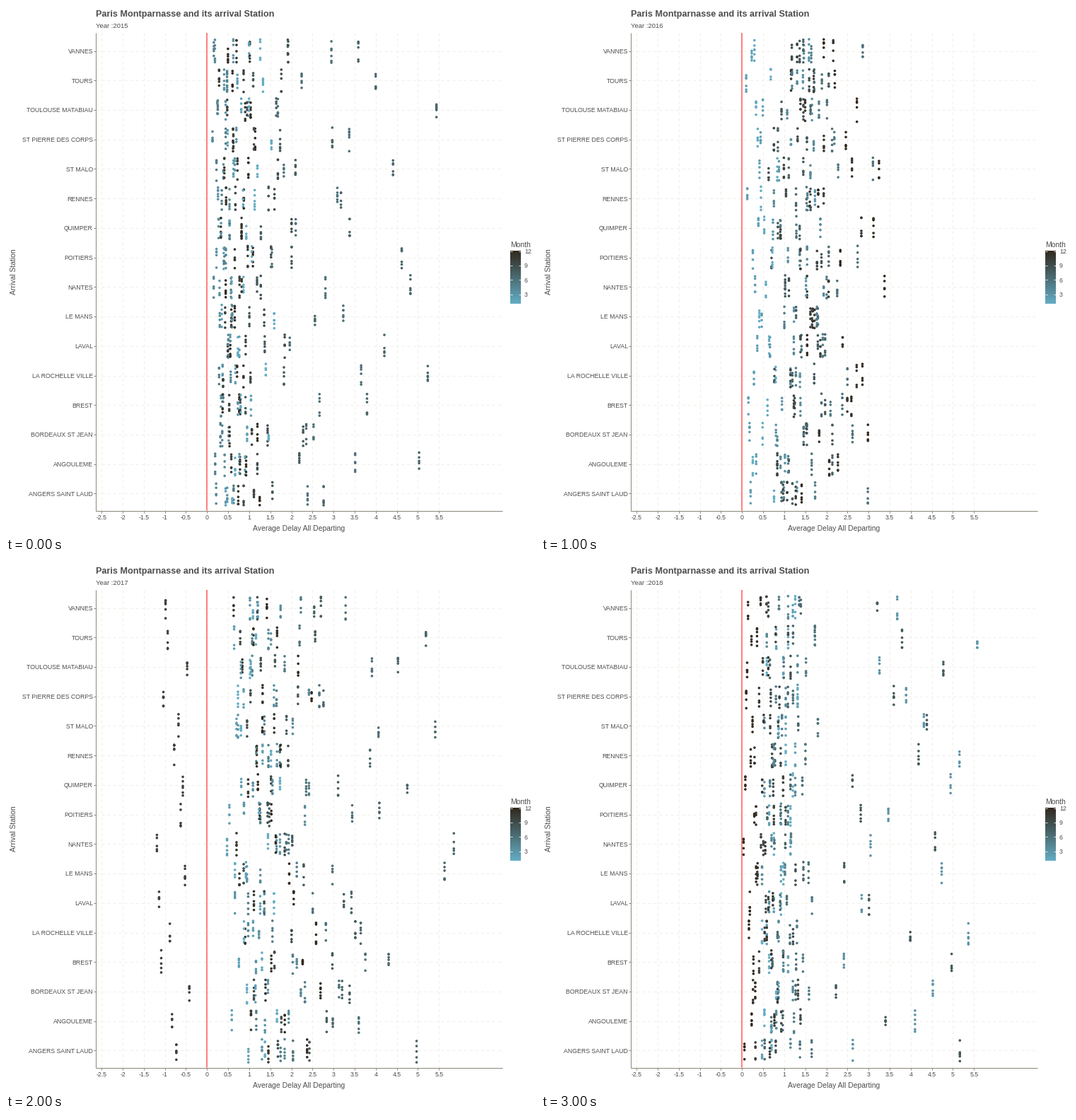
A matplotlib script for the animation above (4000 ms loop, 748 px wide and 748 px high).

```python
import numpy as np
import matplotlib.pyplot as plt
from matplotlib.animation import FuncAnimation
from matplotlib.colors import LinearSegmentedColormap

SIZE, DPI = 748, 100
ZERO, UNIT = 284, 59.64            # x of zero and width of one minute
LEFT, RIGHT, TOP, BOTTOM = 127.5, 702, 38, 713.5
FIRST_ROW, ROW_STEP, JITTER = 63, 41.73, 16.7
GREY, AXIS, GRID = "#4d4d4d", "#8b8878", "#f0eee7"

STATIONS = ["VANNES", "TOURS", "TOULOUSE MATABIAU", "ST PIERRE DES CORPS",
            "ST MALO", "RENNES", "QUIMPER", "POITIERS", "NANTES", "LE MANS",
            "LAVAL", "LA ROCHELLE VILLE", "BREST", "BORDEAUX ST JEAN",
            "ANGOULEME", "ANGERS SAINT LAUD"]
MONTHS = LinearSegmentedColormap.from_list("months", ["#64acc4", "#32291f"])

# Typical delay in minutes, January to December
TYPICAL = {
    2015: [1.1, 0.7, 0.5, 0.35, 0.4, 2.6, 3.9, 1.6, 1.4, 0.75, 0.6, 0.85],
    2016: [0.55, 0.3, 1.2, 1.35, 1.6, 2.2, 1.5, 1.5, 1.15, 1.35, 2.0, 2.4],
    2017: [1.2, 0.9, 1.2, 1.7, 1.7, 2.9, 4.2, 2.5, 1.4, -0.8, 1.15, 1.9],
    2018: [0.9, 0.9, 4.0, 0.9, 1.2, 1.25, 1.0, 3.7, 0.95, 0.65, 0.5, 0.2],
}

plt.rcParams["font.family"] = "Liberation Sans"
fig = plt.figure(figsize=(SIZE / DPI, SIZE / DPI), dpi=DPI, facecolor="white")
ax = fig.add_axes([0, 0, 1, 1])
ax.axis("off")


def px(n):
    return n * 72 / DPI


def text(x, y, label, size, **style):
    return ax.text(x, y, label, fontsize=px(size),
                   **{"color": GREY, "va": "baseline", **style})


def line(xs, ys, color, width=1.0, **style):
    ax.plot(xs, ys, color=color, lw=px(width), solid_capstyle="butt", **style)


def row_y(row):
    return FIRST_ROW + ROW_STEP * row + 0.5


def year_dots(year):
    """Spread each month's delay over the stations and jitter its dots."""
    rng = np.random.default_rng(year)
    points, colors = [], []
    for month, typical in enumerate(TYPICAL[year]):
        spread = 0.05 + 0.22 * abs(typical)
        delays = typical + spread * rng.permutation(
            np.linspace(-1.7, 1.7, len(STATIONS)))
        for row, delay in enumerate(delays):
            for dy in rng.uniform(-JITTER, JITTER, rng.integers(5, 7)):
                points.append((ZERO + UNIT * delay, row_y(row) + dy))
                colors.append(MONTHS(month / 11))
    order = rng.permutation(len(points))
    return np.array(points)[order], np.array(colors)[order]


YEARS = [(year, *year_dots(year)) for year in TYPICAL]

# Grid, ticks and axes
dashed = dict(dashes=(4, 4), zorder=0)
for row, station in enumerate(STATIONS):
    y = row_y(row)
    line([LEFT, RIGHT], [y, y], GRID, **dashed)
    line([LEFT - 3, LEFT], [y, y], AXIS)
    text(123, y + 3.4, station, 8.8, ha="right")
for half in range(-5, 12):
    x = ZERO + half * UNIT / 2 + 0.3
    line([x, x], [BOTTOM, TOP], GRID, **dashed)
    line([x, x], [BOTTOM, BOTTOM + 3], AXIS)
    text(x, 725.5, f"{half / 2:g}", 8.8, ha="center")
line([LEFT, LEFT], [TOP, BOTTOM + 0.5], AXIS)
line([LEFT - 0.5, RIGHT], [BOTTOM, BOTTOM], AXIS)
line([ZERO, ZERO], [TOP, BOTTOM], "#ff2020", 1.1, zorder=2, snap=False)

text(127, 15, "Paris Montparnasse and its arrival Station", 12.65, weight="bold")
subtitle = text(127, 31, "", 9.5)
text(414.5, 741.5, "Average Delay All Departing", 10.4, ha="center")
text(11, 375.5, "Arrival Station", 10.4, rotation=90, ha="center", va="center")

# Month colour bar
text(713, 341, "Month", 10.4)
ax.imshow(np.linspace(1, 0, 75)[:, None], cmap=MONTHS, vmin=0, vmax=1,
          extent=[713, 728, 421, 346], aspect="auto")
for month in (3, 6, 9, 12):
    y = 346.5 + (12 - month) * 6.8
    line([713, 716], [y, y], "white", 0.8)
    line([725, 728], [y, y], "white", 0.8)
    text(733, y + 3.3, str(month), 8.8)

dots = ax.scatter([], [], s=px(3.6) ** 2, linewidths=0, zorder=3)
ax.set_xlim(0, SIZE)
ax.set_ylim(SIZE, 0)


def draw(index):
    year, points, colors = YEARS[index]
    dots.set_offsets(points)
    dots.set_facecolors(colors)
    subtitle.set_text(f"Year :{year}")
    return dots, subtitle


anim = FuncAnimation(fig, draw, frames=len(YEARS), interval=1000,
                     repeat=True, repeat_delay=0)
plt.show()
```
